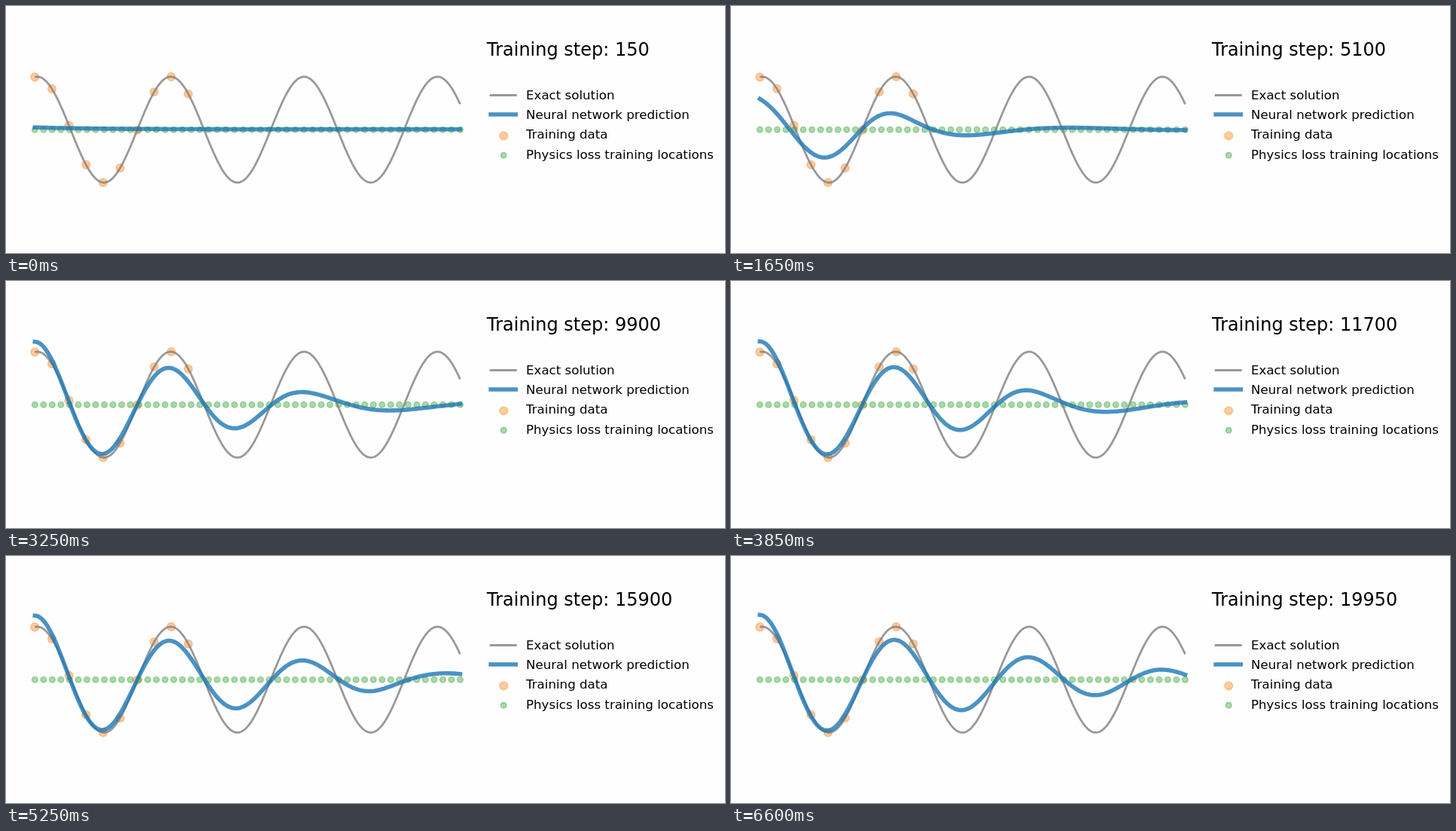
Animation of 954x328 px, one loop 6.65 s. Source, as an HTML page:

```html
<!DOCTYPE html>
<html lang="en">
<head>
<meta charset="utf-8">
<title>Training progress</title>
<style>
  html, body { margin: 0; width: 100%; height: 100%; overflow: hidden; background: #fefefe; }
  svg { display: block; width: 954px; height: 328px; }
  text { font: 16.667px "DejaVu Sans", sans-serif; fill: #000; }
  #step { font-size: 24px; }
  path { fill: none; stroke-linecap: square; stroke-linejoin: round; stroke-opacity: .8; }
  #exact { stroke-linecap: butt; }
  .exact { stroke: #808080; stroke-width: 2.78; }
  .network { stroke: #1f77b4; stroke-width: 5.56; }
  circle { stroke-width: 1.39; fill-opacity: .4; stroke-opacity: .4; }
  .data { fill: #ff7f0e; stroke: #ff7f0e; r: 5.38px; }
  .physics { fill: #2ca02c; stroke: #2ca02c; r: 3.8px; }
</style>
</head>
<body>
<svg viewBox="0 0 954 328">
  <g id="dots"></g>
  <path id="exact" class="exact"/>
  <path id="network" class="network"/>
  <text id="step" x="638" y="66"></text>
  <path class="exact" d="M643.2 118.5H676.4"/>
  <path class="network" d="M643.2 144H676.4"/>
  <circle class="data" cx="660.3" cy="172.3"/>
  <circle class="physics" cx="660.3" cy="198.3"/>
  <text x="690" y="124">Exact solution</text>
  <text x="690" y="150">Neural network prediction</text>
  <text x="690" y="176">Training data</text>
  <text x="690" y="203">Physics loss training locations</text>
</svg>
<script>
const LEFT = 38.3, WIDTH = 564.3, AXIS = 164.2;
const FRAME = 50, FRAMES = 133, STEPS_PER_FRAME = 150;
const SAMPLES = 240;
const byId = id => document.getElementById(id);

const exactY = x => AXIS - 70.3 * Math.cos(2 * Math.PI * (x - 41.5) / 177);

// The prediction is a damped cosine. It first grows to fit the data,
// then its reach spreads slowly to the right.
function predictionAt(time) {
  const halfPeriod = 89.2, damping = 0.24;
  const tilt = Math.atan(damping / Math.PI); // makes the extrema fall on whole phases
  const fit = 1 / (1 + Math.exp((1593 - time) / 155));
  const spread = Math.max(0, time - 2500) / 4100;
  const amplitude = fit * (83 + 3 * spread) / Math.cos(tilt);
  const reach = 0.45 + 3.4 * fit + 3.15 * spread ** 1.6;

  return x => {
    const u = (x - LEFT) / halfPeriod;
    const lead = 0.5 * (1 - fit) * Math.exp(-2 * u);
    const lag = 0.18 * Math.max(0, u - reach + 0.3) ** 1.5;
    const phase = u + lead - lag;
    const envelope = Math.exp(-damping * phase) / (1 + (phase / reach) ** 4);
    const untrained = (1 - fit) * (0.4 + 2.6 * Math.exp(-u));
    return AXIS - untrained - amplitude * envelope * Math.cos(Math.PI * phase - tilt);
  };
}

function curvePath(yAt) {
  const points = Array.from({ length: SAMPLES + 1 }, (_, i) => {
    const x = LEFT + WIDTH * i / SAMPLES;
    return `${x.toFixed(2)} ${yAt(x).toFixed(2)}`;
  });
  return 'M' + points.join('L');
}

function addDots(kind, count, gap, yAt) {
  for (let i = 0; i < count; i++) {
    const dot = document.createElementNS('http://www.w3.org/2000/svg', 'circle');
    const x = LEFT + i * gap;
    dot.setAttribute('class', kind);
    dot.setAttribute('cx', x);
    dot.setAttribute('cy', yAt(x));
    byId('dots').append(dot);
  }
}

function draw(time) {
  const frame = Math.floor(time / FRAME) % FRAMES;
  byId('network').setAttribute('d', curvePath(predictionAt(frame * FRAME)));
  byId('step').textContent = `Training step: ${(frame + 1) * STEPS_PER_FRAME}`;
}

addDots('data', 10, WIDTH * 20 / 499, exactY);
addDots('physics', 50, WIDTH / 49, () => AXIS);
byId('exact').setAttribute('d', curvePath(exactY));

const start = performance.now();
function tick() {
  draw(performance.now() - start);
  requestAnimationFrame(tick);
}
tick();
</script>
</body>
</html>
```
